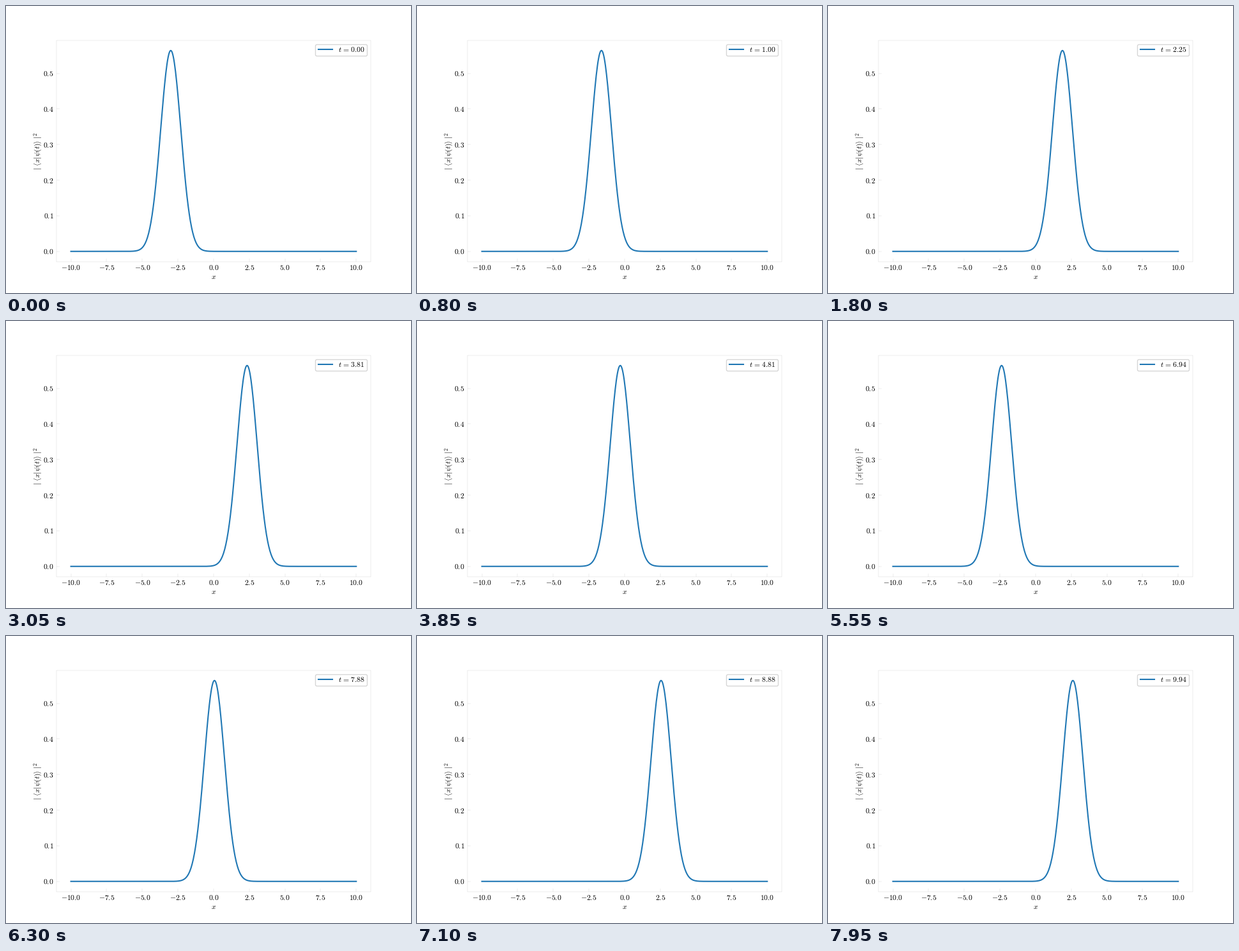
A matplotlib script for the animation above (8000 ms loop, 634x450 px).

```python
import numpy as np
import matplotlib.pyplot as plt
from matplotlib.animation import FuncAnimation
from matplotlib.patches import FancyBboxPatch
from matplotlib.lines import Line2D
from matplotlib.transforms import Affine2D

W, H, DPI = 634, 450, 100
FRAMES, INTERVAL = 160, 50
DT = 1 / 16          # time per frame, in oscillator units
X0 = -3.0            # initial displacement
SIZE = 8.4
HAIR = 0.05          # frame and tick line width

plt.rcParams.update({
    "font.family": "Liberation Serif",
    "mathtext.fontset": "cm",
    "font.size": SIZE,
    "axes.linewidth": HAIR,
})

fig = plt.figure(figsize=(W / DPI, H / DPI), dpi=DPI, facecolor="white")
ax = fig.add_axes([0.125, 0.11, 0.775, 0.77])

# Pixel coordinates with the origin at the top left
pixels = Affine2D().scale(1, -1).translate(0, H)


def label(x, y, s, **kw):
    return fig.text(x, y, s, transform=pixels, va="baseline", **kw)


def density(t):
    """Probability density of a coherent state in a harmonic well."""
    return np.exp(-(x - X0 * np.cos(t)) ** 2) / np.sqrt(np.pi)


x = np.linspace(-10, 10, 500)
peak = 1 / np.sqrt(np.pi)
curve, = ax.plot(x, density(0), color="#1f77b4", lw=1.5)

ax.set_xlim(-11, 11)
ax.set_ylim(-0.05 * peak, 1.05 * peak)
ax.set_xticks(np.arange(-10, 10.1, 2.5))
ax.set_yticks(np.arange(6) / 10)
for axis in (ax.xaxis, ax.yaxis):
    axis.set_major_formatter(lambda v, pos: f"${v:.1f}$")
ax.tick_params(direction="in", width=HAIR, length=3.5, pad=3.5)

# The calligraphic font holds text-size angle brackets at h and i
bra, ket = r"\mathcal{h}", r"\mathcal{i}"
label(325, 428, "$x$", ha="center")
label(53, 227.5,
      rf"$|\hspace{{0.33}}{bra}x|\psi(t){ket}\hspace{{0.33}}|^2$",
      ha="center", rotation=90, rotation_mode="anchor")

# Legend
fig.add_artist(FancyBboxPatch(
    (484.5, 60.5), 81, 18, transform=pixels,
    boxstyle="round,pad=0,rounding_size=2.2",
    facecolor="white", edgecolor="0.8", lw=1, alpha=0.8))
fig.add_artist(Line2D([489, 511.2], [68, 68], transform=pixels,
                      color="#1f77b4", lw=1.5, solid_capstyle="projecting"))
clock = label(519.7, 72, "", ha="left")


def update(n):
    t = n * DT
    curve.set_ydata(density(t))
    clock.set_text(rf"$t\hspace{{0.11}}=\hspace{{0.11}}{t:.2f}$")
    return curve, clock


anim = FuncAnimation(fig, update, frames=FRAMES, interval=INTERVAL,
                     init_func=lambda: update(0), repeat=True,
                     repeat_delay=0, blit=False)

plt.show()
```
